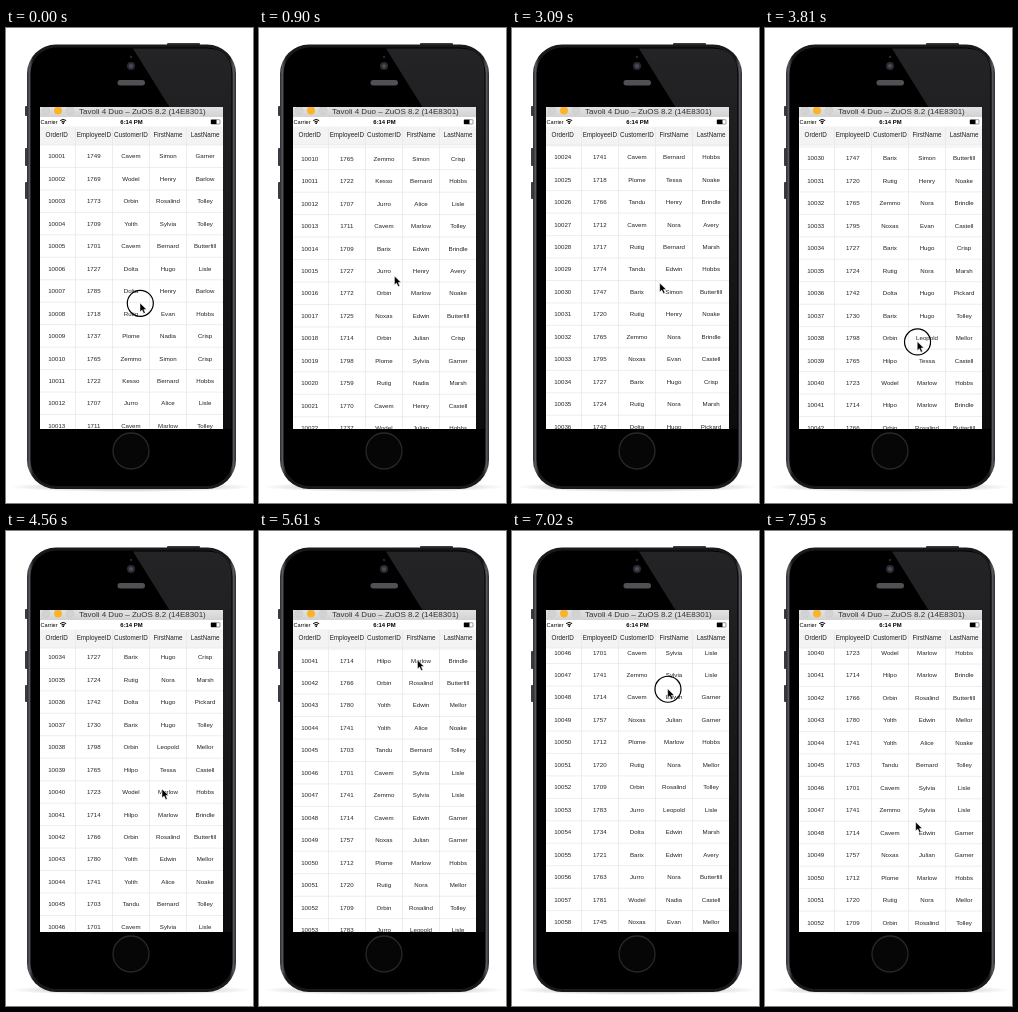
Recreate the animation shown at these times as an HTML page. Size 247 px wide and 475 px high, loop 8000 ms.

```html
<!DOCTYPE html>
<html lang="en">
<head>
<meta charset="utf-8">
<title>Scrolling data grid</title>
<style>
html, body { margin: 0; width: 100%; height: 100%; overflow: hidden; background: #fff }
svg { display: block; width: 247px; height: 475px; font-family: "Liberation Sans", Arial, sans-serif }
.cell { font-size: 6.15px; fill: #222; text-anchor: middle }
.head { font-size: 6.3px; fill: #222; text-anchor: middle }
.line { stroke: #e6e6e6; stroke-width: .7 }
</style>
</head>
<body>
<svg viewBox="0 0 247 475">
  <defs>
    <clipPath id="screen"><rect x="34" y="79" width="183" height="322"/></clipPath>
    <clipPath id="body"><rect x="34" y="117" width="183" height="284"/></clipPath>
    <linearGradient id="rim">
      <stop offset="0" stop-color="#2a2b2f"/><stop offset=".012" stop-color="#55575c"/>
      <stop offset=".03" stop-color="#18191b"/><stop offset=".97" stop-color="#18191b"/>
      <stop offset=".988" stop-color="#55575c"/><stop offset="1" stop-color="#2a2b2f"/>
    </linearGradient>
    <linearGradient id="shine" x2="0" y2="1">
      <stop offset="0" stop-color="#242426"/><stop offset="1" stop-color="#0c0c0d"/>
    </linearGradient>
    <linearGradient id="bar" x2="0" y2="1">
      <stop offset="0" stop-color="#e2e2e2"/><stop offset="1" stop-color="#d2d2d2"/>
    </linearGradient>
    <radialGradient id="floor">
      <stop offset="0" stop-color="#999"/><stop offset="1" stop-color="#fff"/>
    </radialGradient>
  </defs>

  <ellipse cx="125" cy="459" rx="121" ry="5" fill="url(#floor)"/>
  <g fill="#3a3b3f">
    <rect x="19" y="78" width="4" height="10" rx="1"/>
    <rect x="19" y="120" width="4" height="18" rx="1"/>
    <rect x="19" y="154" width="4" height="17" rx="1"/>
    <rect x="161" y="15" width="33" height="4" rx="1"/>
  </g>
  <rect x="21" y="16.5" width="209" height="444.5" rx="29" fill="url(#rim)"/>
  <rect x="24.5" y="19.5" width="202" height="438.5" rx="26"/>
  <path d="M127 20.5H200Q225.500 20.500 225.500 46V401H217V165Z" fill="url(#shine)"/>
  <circle cx="125" cy="29" r="1.2" fill="#29292d"/>
  <circle cx="125" cy="38" r="4" fill="#2b2b31"/>
  <circle cx="125" cy="38" r="2" fill="#4c4c5a"/>
  <rect x="111.500" y="52" width="27.500" height="5.500" rx="2.700" fill="#515155"/>
  <circle cx="125" cy="423" r="18" fill="#060606" stroke="#28282a" stroke-width="1.3"/>

  <g clip-path="url(#screen)">
    <rect x="34" y="79" width="183" height="322" fill="#fff"/>
    <g id="rows" clip-path="url(#body)"><g id="list"></g></g>
    <rect x="34" y="98.5" width="183" height="18.6" fill="#f3f3f3"/>
    <rect x="34" y="79" width="183" height="10" fill="url(#bar)"/>
    <g fill="#d3d3d3" stroke="#c6c6c6" stroke-width=".5">
      <circle cx="40" cy="82.500" r="4"/><circle cx="64" cy="82.500" r="4"/>
    </g>
    <circle cx="52" cy="82.500" r="4" fill="#fbb429"/>
    <text x="73" y="86" font-size="8" fill="#333">Tavoli 4 Duo – ZuOS 8.2 (14E8301)</text>
    <text x="34.5" y="96" font-size="5.6">Carrier</text>
    <g fill="none" stroke="#000">
      <path d="M54.200 92.600q3-2.400 6 0M55.400 94q1.800-1.400 3.600 0"/>
      <rect x="205" y="91.700" width="9" height="4.400" rx=".8" stroke-width=".4"/>
    </g>
    <circle cx="57.2" cy="95.2" r=".9"/>
    <rect x="205" y="91.8" width="5.5" height="4.2"/>
    <text x="125.5" y="96" font-size="5.9" font-weight="bold" text-anchor="middle">6:14 PM</text>
    <g id="head"></g>
  </g>

  <g id="pointer">
    <circle id="ring" cx=".3" cy=".4" r="13" fill="none" stroke="#000" stroke-width="1.200"/>
    <path d="M0 0V9L2.100 7.100 3.700 10.600 5.300 9.900 3.800 6.500H6.600Z" stroke="#fff" stroke-width=".5"/>
  </g>
</svg>
<script>
const LOOP = 8000, PITCH = 22.46, TOP = 117.1, GLIDE = 620;
const titles = ["OrderID", "EmployeeID", "CustomerID", "FirstName", "LastName"];
const customers = "Dolta Orbin Kesso Tandu Plome Jurro Barix Wodel Zemmo Grend Noxas Hilpo Rutig Cavem Yolth".split(" ");
const firsts = "Nadia Rosalind Edwin Henry Tessa Hugo Simon Evan Leopold Sylvia Julian Bernard Marlow Alice Nora".split(" ");
const lasts = "Butterfill Lisle Marsh Castell Tolley Crisp Pickard Avery Mellor Hobbs Barlow Garner Noake Brindle".split(" ");

// Each swipe: the pointer drags the list up by `drag`, then the list coasts on by `coast`.
const swipes = [
  { t: 0, hold: 280, y: 275, drag: 27, coast: 173 },
  { t: 1050, hold: 280, y: 264, drag: 68, coast: 47 },
  { t: 2600, hold: 280, y: 330, drag: 75, coast: 223 },
  { t: 3700, hold: 280, y: 350, drag: 92, coast: 38.5 },
  { t: 5250, hold: 280, y: 235, drag: 106, coast: 196 },
  { t: 6900, hold: 700, y: 130, drag: -161, coast: -2.5 },
];

const $ = id => document.getElementById(id);
const clamp = p => Math.max(0, Math.min(1, p));
const smooth = p => p * p * (3 - 2 * p);
const easeOut = p => 1 - (1 - p) ** 2;

let seed = 7;
const random = n => (seed = seed * 16807 % 2147483647) % n;
const pick = list => list[random(list.length)];

const cells = (words, y, cls) =>
  words.map((w, i) => `<text class="${cls}" x="${50.7 + 37.1 * i}" y="${y}">${w}</text>`).join("");
const line = (x1, y1, x2, y2) => `<path class="line" d="M${x1} ${y1}L${x2} ${y2}"/>`;
const dividers = (y1, y2) => titles.slice(1).map((_, i) => line(69.5 + 37 * i, y1, 69.5 + 37 * i, y2)).join("");

$("head").innerHTML = dividers(99, 117) + line(34, 117, 217, 117) + cells(titles, 109.3, "head");
$("list").innerHTML = Array.from({ length: 62 }, (_, i) => {
  const y = TOP + i * PITCH;
  const row = [10001 + i, 1700 + random(100), pick(customers), pick(firsts), pick(lasts)];
  return line(34, y + PITCH, 217, y + PITCH) + cells(row, y + PITCH / 2 + 2.2, "cell");
}).join("");
$("rows").insertAdjacentHTML("afterbegin", dividers(117, 401));

const dragged = (s, t) => s.drag * clamp((t - s.t) / s.hold);
const coasted = (s, t) => s.coast * easeOut(clamp((t - s.t - s.hold) / GLIDE));
const scrollAt = t => swipes.reduce((sum, s) => sum + dragged(s, t) + coasted(s, t), 0);

// After a swipe the pointer rests while the list coasts, then moves to the next press.
function pointerY(t, swipe, next) {
  const y = swipe.y - dragged(swipe, t);
  if (!next) return y;
  const rest = swipe.t + swipe.hold + GLIDE;
  return y + (next.y - y) * smooth(clamp((t - rest) / (next.t - rest)));
}

function draw(t) {
  const i = swipes.findLastIndex(s => s.t <= t), swipe = swipes[i];
  const x = 134 + 24.5 * Math.sin(Math.PI * t / 11500) ** 2;
  $("list").setAttribute("transform", `translate(0 ${-scrollAt(t)})`);
  $("pointer").setAttribute("transform", `translate(${x} ${pointerY(t, swipe, swipes[i + 1])})`);
  $("ring").setAttribute("opacity", t < swipe.t + swipe.hold ? 1 : 0);
}

const start = performance.now();
function tick() {
  draw((performance.now() - start) % LOOP);
  requestAnimationFrame(tick);
}
tick();
</script>
</body>
</html>
```
